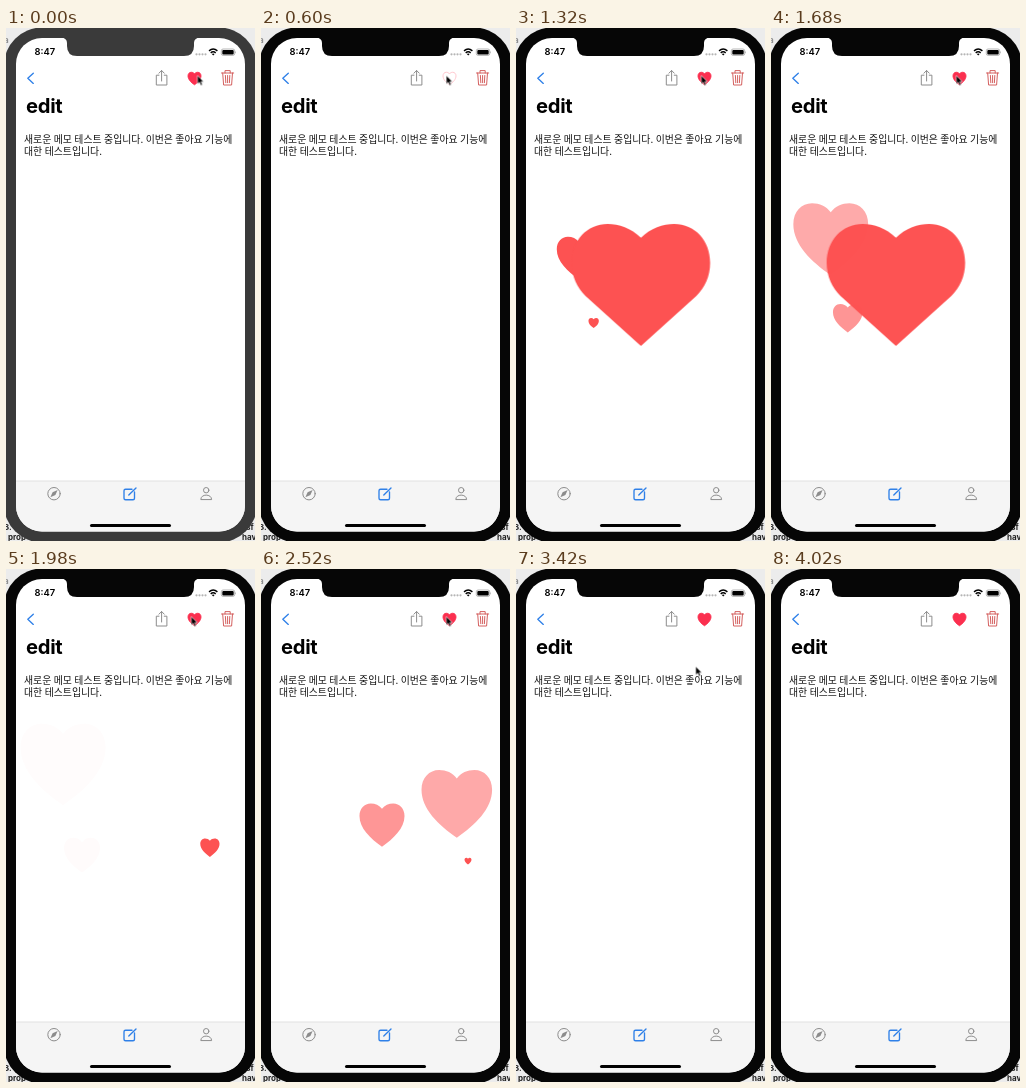
Animation, 249 px wide and 513 px high, one loop 4.38 s. Source, as an HTML page:

```html
<!DOCTYPE html>
<html lang="ko">
<head>
<meta charset="utf-8">
<title>Memo like</title>
<style>
  html, body { margin: 0; width: 100%; height: 100%; overflow: hidden; background: #ececec; }
  svg { display: block; width: 249px; height: 513px; }
  text { font-family: Inter, "Noto Sans CJK KR", "Noto Sans CJK", sans-serif; }
  .code { font: bold 8px "DejaVu Sans Mono", monospace; fill: #222; }
  .memo { font: 9.88px "Noto Sans CJK KR", "Noto Sans CJK", sans-serif; word-spacing: -.3px; fill: #111; }
  .line { fill: none; stroke-width: 1; stroke-linecap: round; stroke-linejoin: round; }
  .grey { stroke: #8c8c8c; }
  .blue { stroke: #2f80e8; stroke-width: 1.35; }
  .red { stroke: #d4605f; }

  .bezel, .like, .pop, .cursor { animation: 4380ms linear infinite; }
  .bezel { animation-name: bezel; animation-timing-function: step-end; }
  .like { animation-name: like; animation-timing-function: step-end; }
  .pop { animation-name: pop; }
  .cursor { animation-name: cursor; }

  @keyframes bezel {
    0% { fill: #3a3a3a; }
    4.11%, 100% { fill: #060606; }
  }
  @keyframes like {
    0% { fill: #fb2f4f; stroke: #fb2f4f; }
    9.59% { fill: #fff; stroke: #ffc3cb; }
    20.55%, 100% { fill: #fb2f4f; stroke: #fb2f4f; }
  }
  @keyframes pop {
    0%, 20.55% { transform: scale(0); opacity: 1; animation-timing-function: ease-out; }
    23.3% { transform: scale(1.45); }
    24.66%, 38.36% { transform: scale(1.385); opacity: 1; }
    42.47%, 100% { transform: scale(1.385); opacity: 0; }
  }
  @keyframes cursor {
    0%, 1.37% { transform: translate(191.5px, 47.5px); }
    6.85%, 78.07% { transform: translate(185.3px, 47.5px); }
    78.08% { transform: translate(180px, 96.5px); }
    89.04% { transform: translate(25px, 504px); }
    91.78%, 100% { transform: translate(25px, 516px); }
  }
</style>
</head>
<body>
<svg viewBox="0 0 249 513">
  <defs>
    <path id="wide" d="M0-34C-7-41-16-44-24-44C-39-44-50-32-50-16C-50-6-46 2-40 8L0 44L40 8C46 2 50-6 50-16C50-32 39-44 24-44C16-44 7-41 0-34Z"/>
    <path id="heart" d="M0-36C-6-44-15-48-25-48C-39-48-50-37-50-20C-50 7-26 30 0 48C26 30 50 7 50-20C50-37 39-48 25-48C15-48 6-44 0-36Z"/>
    <clipPath id="screen"><rect x="10" y="10" width="229" height="493.5" rx="26"/></clipPath>
  </defs>

  <g class="code">
    <text x="-2" y="15" fill-opacity=".45">a</text>
    <text x="-2" y="502">3.</text>
    <text x="2" y="512">prop</text>
    <text x="240" y="502">sf</text>
    <text x="236" y="512">hav</text>
  </g>

  <rect class="bezel" x="-2" y="-.5" width="253" height="515" rx="38"/>
  <g clip-path="url(#screen)">
    <path fill="#fff" d="M10 10H239V504H10Z"/>
    <path fill="#f5f5f5" d="M10 453H239V504H10Z"/>
    <path stroke="#d6d6d6" stroke-width=".7" d="M10 453H239"/>
  </g>
  <path class="bezel" d="M55 9.5Q61 10 61 15V18Q61 28 71 28H178Q188 28 188 18V15Q188 10 194 9.5Z"/>
  <rect x="84" y="496" width="81" height="3" rx="1.5"/>

  <!-- Status bar -->
  <text x="28.5" y="27.2" font-size="9.4" font-weight="600">8:47</text>
  <g fill="#b5b5b5">
    <circle cx="190.5" cy="26.3" r="1.1"/><circle cx="193.5" cy="26.3" r="1.1"/>
    <circle cx="196.5" cy="26.3" r="1.1"/><circle cx="199.5" cy="26.3" r="1.1"/>
  </g>
  <g fill="none" stroke="#000" stroke-width="1.4">
    <path d="M203 22.9Q207.2 19.3 211.4 22.9M204.7 24.9Q207.2 22.8 209.7 24.9"/>
  </g>
  <path d="M205.8 26.1Q207.2 25 208.6 26.1L207.2 27.6Z"/>
  <rect x="215.3" y="21" width="13.4" height="6.4" rx="1.8" fill="none" stroke="#999" stroke-width=".7"/>
  <rect x="216.3" y="22" width="11.4" height="4.4" rx="1"/>
  <path fill="#999" d="M229.3 23Q230.8 24.2 229.3 25.4Z"/>

  <!-- Navigation bar -->
  <path class="line blue" d="M27.3 45.2L21.8 50.3L27.3 55.4"/>
  <path class="line grey" d="M153 47.2H150.3V57H160.9V47.2H158.2M155.6 53V42.6M152.9 45.2L155.6 42.5L158.3 45.2"/>
  <g transform="translate(188.5 50.5) scale(.13)">
    <use class="like" href="#heart" stroke-width="7"/>
  </g>
  <path class="line red" d="M215.5 45H227.7M219 45V42.6H224.2V45M216.7 45L217.6 57H225.6L226.5 45M219.4 47.5L219.8 54.7M221.6 47.5V54.7M223.8 47.5L223.4 54.7"/>

  <text x="20" y="85.3" font-size="20.2" font-weight="700" letter-spacing="-.3">edit</text>
  <text class="memo" x="18" y="115">새로운 메모 테스트 중입니다. 이번은 좋아요 기능에</text>
  <text class="memo" x="18" y="127.3">대한 테스트입니다.</text>

  <!-- Tab bar -->
  <circle class="line grey" cx="48" cy="465.7" r="6.2"/>
  <path fill="#8c8c8c" d="M51.6 462.1L49.4 467.1L44.4 469.3L46.6 464.3Z"/>
  <path class="line blue" d="M126 461.2H119.5Q118 461.2 118 462.7V470.2Q118 471.7 119.5 471.7H127Q128.5 471.7 128.5 470.2V464M122.8 467.1L130 460"/>
  <circle class="line grey" cx="200.2" cy="462.2" r="2.7"/>
  <path class="line grey" d="M194.8 471.2C194.8 465.6 205.6 465.6 205.6 471.2Z"/>

  <g fill="#fd5252">
    <g id="floats"></g>
    <g transform="translate(124.9 256.9)"><use class="pop" href="#wide"/></g>
  </g>

  <path class="cursor" fill="#000" stroke="#fff" stroke-width=".6" d="M0 0V8.6L2 6.8L3.4 10L5 9.3L3.6 6.2H6.2Z"/>
</svg>
<script>
  const LOOP = 4380;
  // Times in ms; from/to are heart centres, width is the final size.
  const hearts = [
    { start: 980, life: 1010, width: 85, from: [66, 248], to: [57, 195], fade: 1.6 },
    { start: 1180, life: 810, width: 36, from: [78, 297], to: [76, 286], fade: 1.6 },
    { start: 1840, life: 1000, width: 81, from: [206, 290], to: [191, 209], fade: 1.55 },
    { start: 2280, life: 760, width: 91, from: [121, 257], to: [121, 254], fade: 0.88 },
    { start: 2470, life: 650, width: 52, from: [207, 295], to: [207, 258], fade: 1.6 }
  ];
  const mix = (a, b, k) => a + (b - a) * k;

  for (const h of hearts) {
    h.el = document.createElementNS("http://www.w3.org/2000/svg", "use");
    h.el.setAttribute("href", "#heart");
    document.getElementById("floats").append(h.el);
  }

  function draw(t) {
    for (const { el, start, life, width, from, to, fade } of hearts) {
      const age = (t - start) / life;
      const alive = age > 0 && age < 1;
      el.setAttribute("visibility", alive ? "visible" : "hidden");
      if (!alive) continue;
      const scale = width / 100 * (1 - (1 - age) ** 1.8);
      const x = mix(from[0], to[0], age), y = mix(from[1], to[1], age);
      el.setAttribute("transform", `translate(${x} ${y}) scale(${scale})`);
      el.setAttribute("opacity", Math.min(1, fade * (1 - age)));
    }
  }

  let begin;
  function tick(now) {
    begin ??= now;
    draw((now - begin) % LOOP);
    requestAnimationFrame(tick);
  }
  requestAnimationFrame(tick);
</script>
</body>
</html>
```
